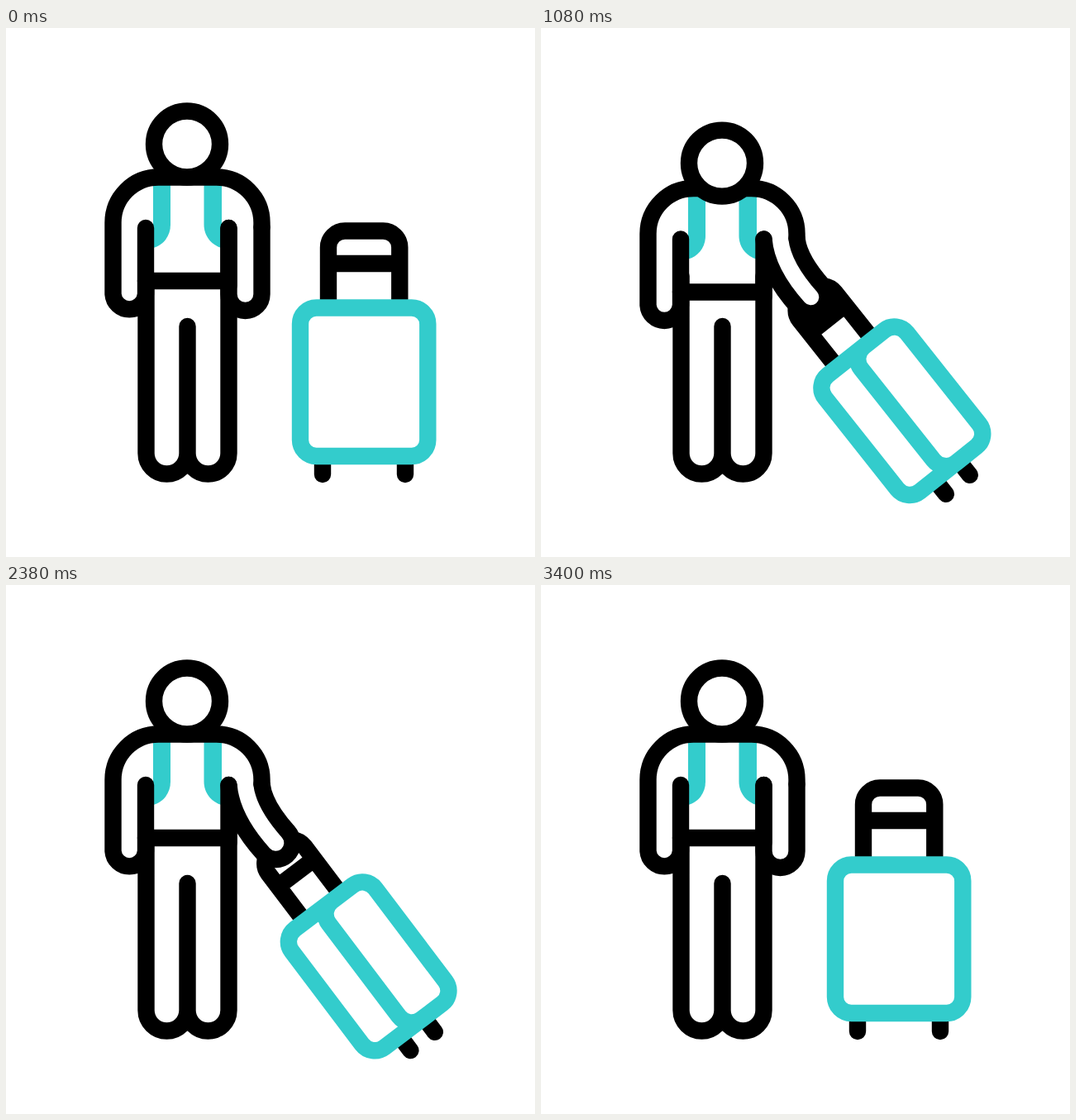
An HTML page that plays this animation: 640 by 640 pixels, repeating every 3.6 s.

```html
<!DOCTYPE html>
<html lang="en">
<head>
<meta charset="utf-8">
<title>Traveller with suitcase</title>
<style>
  html, body { margin: 0; width: 100%; height: 100%; overflow: hidden; background: #fff; }
  svg { display: block; width: 100vw; height: 100vh; }
  .ink, .teal { fill: none; stroke: #000; stroke-width: 20.4; stroke-linecap: round; stroke-linejoin: round; }
  .teal { stroke: #33cccc; }
  .strap { fill: #33cccc; }
  .solid { fill: #fff; }
</style>
</head>
<body>
<svg viewBox="0 0 640 640">
  <g id="bag">
    <path id="frame" class="ink"/>
    <path id="shell" class="teal"/>
  </g>
  <path class="ink" d="M169.5 300V514.5A25 25 0 0 0 219.5 514.5V361V514.5A25 25 0 0 0 269.5 514.5V300"/>
  <g id="torso">
    <path class="strap" d="M178 186H199V238C199 252 190 263 178 266Z"/>
    <path class="strap" d="M261 186H239.500V238C239.500 252 249 263 261 266Z"/>
    <path id="arm" class="ink solid"/>
    <path class="ink" d="M309.500 241V235.500A55 55 0 0 0 254.500 180.500H184.500A55 55 0 0 0 129.500 235.500V322A19.800 19.800 0 0 0 169 322V242"/>
    <path class="ink" d="M169 306H269.500M269.500 242V312"/>
  </g>
  <circle id="head" class="ink solid" cx="219" cy="140.500" r="40"/>
</svg>
<script>
const LOOP = 3600;
const el = id => document.getElementById(id);
const mix = (a, b, k) => a + (b - a) * k;
const sine = x => (1 - Math.cos(Math.PI * x)) / 2;
const easeOut = x => 1 - (1 - x) * (1 - x);

// Keys are [time, value, easing into this key]
const turnKeys = [[0, 0], [500, 1], [3040, 1], [3400, 0, easeOut]];
const tiltKeys = [[500, 0], [1000, 38], [1200, 39.2], [1300, 39.2], [1790, 34], [2170, 37.1], [2480, 37.1], [3060, 0]];
const reachKeys = [[440, 0], [1000, 1], [2480, 1], [2970, 0]];
const bobKeys = [[580, 0], [1180, 14.5], [1300, 14.5], [1790, -17], [2170, 0]];

function track(keys, t) {
  if (t <= keys[0][0]) return keys[0][1];
  for (let i = 1; i < keys.length; i++) {
    const [t1, v1, ease = sine] = keys[i];
    const [t0, v0] = keys[i - 1];
    if (t < t1) return mix(v0, v1, ease((t - t0) / (t1 - t0)));
  }
  return keys[keys.length - 1][1];
}

function roundRect(x0, y0, x1, y1, r) {
  return `M${x0 + r} ${y0}H${x1 - r}A${r} ${r} 0 0 1 ${x1} ${y0 + r}V${y1 - r}` +
    `A${r} ${r} 0 0 1 ${x1 - r} ${y1}H${x0 + r}A${r} ${r} 0 0 1 ${x0} ${y1 - r}` +
    `V${y0 + r}A${r} ${r} 0 0 1 ${x0 + r} ${y0}Z`;
}

function drawBag(turn, tilt) {
  const at = (front, side) => mix(front, side, turn);
  const hl = at(390, 474.2), hr = at(476.3, 528.9);
  const wl = at(383, 482.3), wr = at(483, 519.2);
  const left = at(356, 440), right = at(510.3, 566.5), split = at(356, 496);
  el('frame').setAttribute('d',
    `M${hl} 335V265.500A20 20 0 0 1 ${hl + 20} 245.500H${hr - 20}A20 20 0 0 1 ${hr} 265.500V335` +
    `M${hl} 285H${hr}M${wl} 522V540M${wr} 522V540`);
  el('shell').setAttribute('d',
    roundRect(left, 338.5, right, 518, 19.5) + roundRect(split, 338.5, right, 518, 19.5));
  el('bag').setAttribute('transform', `rotate(${-tilt} 520.2 541)`);
}

// The arm is a curved axis from shoulder to hand, offset to both sides
function drawArm(reach) {
  const r = 20, phi = 41 * reach * Math.PI / 180;
  const hx = 289.5 + 37 * reach, hy = 322 - 15 * reach + 5 * reach * reach;
  const cx = 289.5 + 3 * reach, cy = 274;
  const psi = phi / 2 + 0.03 * reach, k = r / Math.cos(phi / 2);
  const bx = k * Math.cos(psi), by = -k * Math.sin(psi);
  const ex = r * Math.cos(phi), ey = -r * Math.sin(phi);
  el('arm').setAttribute('d',
    `M309.500 241Q${cx + bx} ${cy + by} ${hx + ex} ${hy + ey}` +
    `A${r} ${r} 0 0 1 ${hx - ex} ${hy - ey}Q${cx - bx} ${cy - by} 269.500 242`);
}

function draw(t) {
  const bob = track(bobKeys, t);
  const nod = bob > 0 ? bob * bob * 0.052 : 0;
  drawBag(track(turnKeys, t), track(tiltKeys, t));
  drawArm(track(reachKeys, t));
  el('torso').setAttribute('transform', `translate(0 ${bob})`);
  el('head').setAttribute('transform', `translate(0 ${bob + nod})`);
}

const start = performance.now();
function tick() {
  draw((performance.now() - start) % LOOP);
  requestAnimationFrame(tick);
}
draw(0);
requestAnimationFrame(tick);
</script>
</body>
</html>
```
